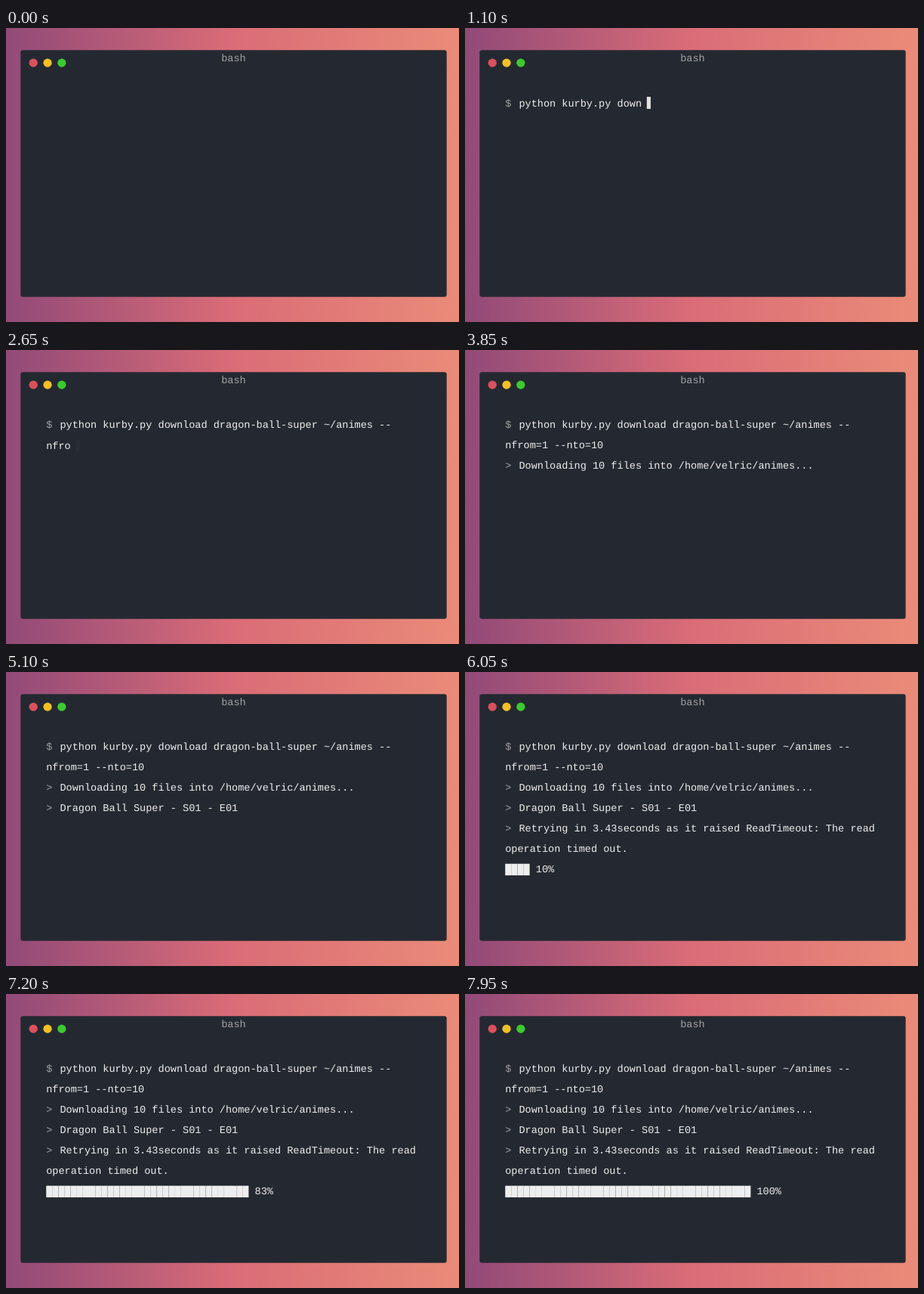
Recreate the animation shown at these times as an HTML page with a canvas. Size 600 px wide and 389 px high, loop 8000 ms.

```html
<!DOCTYPE html>
<html lang="en">
<head>
<meta charset="utf-8">
<title>Terminal</title>
<style>
  html, body { margin: 0; width: 100%; height: 100%; overflow: hidden; }
  canvas { display: block; width: 600px; height: 389px; }
</style>
</head>
<body>
<canvas id="stage" width="600" height="389"></canvas>
<script>
const ctx = document.getElementById('stage').getContext('2d');
const LOOP = 8000;
const TYPE_DELAY = 40.8;
const SCALE = 0.7525;
const ORIGIN = { x: 19.3, y: 29.2 };
const FONT = 18, PAD = 45, INDENT = PAD + FONT * 1.35;
const TEXT = '#eee', SUBTLE = '#a2a2a2';

const COMMAND = 'python kurby.py download dragon-ball-super ~/animes --nfrom=1 --nto=10';
const BREAK = COMMAND.indexOf('nfrom');
const WRAP_AT = BREAK + 4; // the word no longer fits beside the cursor
const PROMPT_AT = 250, TYPING_AT = 265, PROGRESS_AT = 5850;
const BAR_LENGTH = 40;

const OUTPUT = [
  { at: 3850, row: 2, text: 'Downloading 10 files into /home/velric/animes...' },
  { at: 4450, row: 3, text: 'Dragon Ball Super - S01 - E01' },
  { at: 5150, row: 4, text: 'Retrying in 3.43seconds as it raised ReadTimeout: The read',
    rest: 'operation timed out.' },
];

const baseline = row => 97.8 + row * 36;

function write(text, x, y, color = TEXT) {
  ctx.fillStyle = color;
  ctx.fillText(text, x, y);
}

// CSS "ease": cubic-bezier(.25, .1, .25, 1)
function ease(x) {
  let lo = 0, hi = 1, u = x;
  for (let i = 0; i < 20; i++) {
    u = (lo + hi) / 2;
    const bx = 0.75 * u * (1 - u) + u ** 3;
    if (bx < x) lo = u; else hi = u;
  }
  return 0.3 * u * (1 - u) ** 2 + 3 * u * u * (1 - u) + u ** 3;
}

function blink(t) {
  const phase = (t / 500) % 2;
  return phase < 1 ? 1 - ease(phase) : ease(phase - 1);
}

const steps = (t, start, max) =>
  Math.max(0, Math.min(max, Math.floor((t - start) / TYPE_DELAY)));

function drawWindow() {
  ctx.setTransform(1, 0, 0, 1, 0, 0);
  const sky = ctx.createLinearGradient(0, 0, 600, 0);
  sky.addColorStop(0, '#914a78');
  sky.addColorStop(0.5, '#da6c77');
  sky.addColorStop(1, '#ea8b78');
  ctx.fillStyle = sky;
  ctx.fillRect(0, 0, 600, 389);

  ctx.setTransform(SCALE, 0, 0, SCALE, ORIGIN.x, ORIGIN.y);
  ctx.fillStyle = '#242931';
  ctx.beginPath();
  ctx.roundRect(0, 0, 750, 434, 4);
  ctx.fill();

  ['#d9515d', '#f4c025', '#3ec930'].forEach((color, i) => {
    ctx.fillStyle = color;
    ctx.beginPath();
    ctx.arc(22.5 + i * 25, 22.5, 7.5, 0, Math.PI * 2);
    ctx.fill();
  });

  ctx.textAlign = 'center';
  write('bash', 375, 20, SUBTLE);
  ctx.textAlign = 'left';
}

function drawCommand(t) {
  const typed = COMMAND.slice(0, steps(t, TYPING_AT, COMMAND.length));
  const wrapped = typed.length >= WRAP_AT;
  const active = t < OUTPUT[0].at;
  const first = wrapped ? typed.slice(0, BREAK) : typed;
  const second = wrapped ? typed.slice(BREAK) : '';
  // The cursor glyph pushes its own line down slightly.
  const nudge = row => active && row === Number(wrapped) ? 1 : 0;

  write('$', PAD, baseline(0) + nudge(0), SUBTLE);
  write(first, INDENT, baseline(0) + nudge(0));
  write(second, PAD, baseline(1) + nudge(1));

  if (active) {
    const last = wrapped ? second : first;
    const x = (wrapped ? PAD : INDENT) + ctx.measureText(last).width + FONT / 2;
    ctx.globalAlpha = blink(t - PROMPT_AT);
    ctx.fillStyle = TEXT;
    ctx.fillRect(x, baseline(Number(wrapped)) - 15.6, 6.8, 21.2);
    ctx.globalAlpha = 1;
  }
}

function drawOutput(t) {
  for (const { at, row, text, rest } of OUTPUT) {
    if (t < at) continue;
    write('>', PAD, baseline(row), SUBTLE);
    write(text, INDENT, baseline(row));
    if (rest) write(rest, PAD, baseline(row + 1));
  }
  const done = steps(t, PROGRESS_AT, BAR_LENGTH);
  if (done) {
    const percent = Math.round(done / BAR_LENGTH * 100);
    write('█'.repeat(done) + ` ${percent}%`, PAD, baseline(6));
  }
}

function render(now) {
  const t = now % LOOP;
  ctx.font = `${FONT}px "Liberation Mono", monospace`;
  ctx.textRendering = 'geometricPrecision';
  drawWindow();
  if (t >= PROMPT_AT) drawCommand(t);
  drawOutput(t);
}

const start = performance.now();
function tick() {
  render(performance.now() - start);
  requestAnimationFrame(tick);
}
tick();
</script>
</body>
</html>
```
